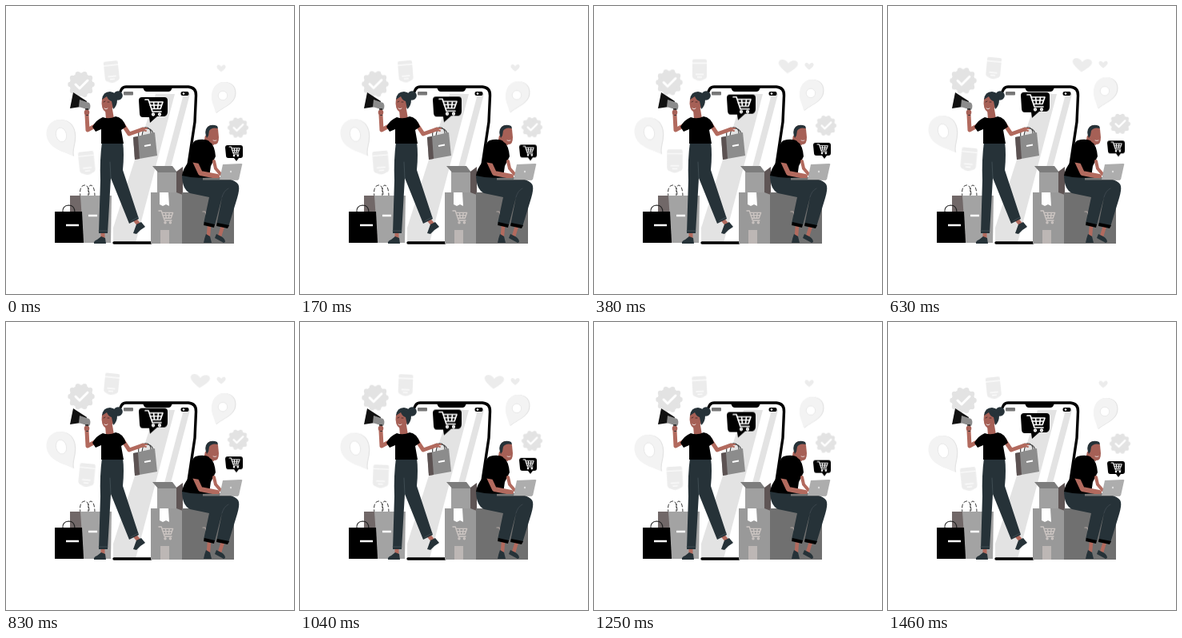
Write an HTML page without scripts that moves like this. It is 360x360 px and loops after 1500 ms.

```html
<!DOCTYPE html>
<html lang="en">
<head>
<meta charset="utf-8">
<title>Online shopping</title>
<style>
  html, body { margin: 0; width: 100%; height: 100%; overflow: hidden; background: #fff; }
  svg { display: block; width: 100vw; height: 100vh; }
  .float {
    --y: -5px; --from: 0deg; --to: 0deg;
    transform-box: fill-box; transform-origin: center;
    animation: float 750ms ease-in-out infinite alternate;
  }
  @keyframes float {
    from { transform: rotate(var(--from)); }
    to { transform: translateY(var(--y)) rotate(var(--to)); }
  }
  .tag { --from: -6deg; --to: 6deg; }
  .bubble { --y: -6.5px; }
  .blink { animation: blink 1500ms step-end infinite; }
  @keyframes blink {
    0%, 81% { visibility: hidden; }
    19% { visibility: visible; }
  }
  .pale { fill: #e3e3e3; }
  .faint { fill: #ececec; }
  .light { fill: #f3f3f3; }
  .skin { fill: #a66056; }
  .dark { fill: #263238; }
  .limb { fill: none; stroke: #b26a5e; stroke-linecap: round; stroke-linejoin: round; }
  .line { fill: none; stroke-linecap: round; stroke-linejoin: round; }
</style>
</head>
<body>
<svg viewBox="0 0 360 360" aria-hidden="true">
  <defs>
    <g id="cart" class="line" stroke-width="1.700">
      <path d="M0 0h4l5 15h11M5 3h17l-3 8.500H8M6 7h14M10.500 3l1 8.500M16.500 3l-1 8.500"/>
      <circle cx="10" cy="18.500" r="1.300"/><circle cx="18" cy="18.500" r="1.300"/>
    </g>
    <g id="badge">
      <circle class="pale" r="14.500"/>
      <circle r="13.500" fill="none" stroke="#e3e3e3" stroke-width="6.500" stroke-linecap="round" pathLength="80" stroke-dasharray="0 8"/>
      <path class="line" d="M-7 0l5 5L8-5" stroke="#fff" stroke-width="3"/>
    </g>
    <g id="tag">
      <path class="faint" d="M-7-14H7Q9-14 9-12V7Q9 10 6 11Q0 15-6 11Q-9 10-9 7V-12Q-9-14-7-14Z"/>
      <path d="M-9-9H9M-5 5H5M-3 8.500H3" stroke="#fafafa" stroke-width="1.300"/>
    </g>
    <path id="heart" class="faint" d="M0 8C-5 4-11-1-10-5C-9-9-3-9 0-4C3-9 9-9 10-5C11-1 5 4 0 8Z"/>
    <path id="left-pin" d="M84 188C77 183 58 181 52 167C47 154 55 142 67 142C80 142 87 152 86 165C86 173 82 180 84 188Z"/>
    <path id="right-pin" d="M262 134C261 126 256 121 257 111C258 101 264 95 272 95C282 95 288 102 286 112C284 123 270 127 262 134Z"/>
    <clipPath id="screen"><path d="M148 103H229Q236 103 236 110L224 295H134V200L143 110Z"/></clipPath>
  </defs>

  <!-- Floating icons -->
  <g class="float"><use href="#badge" x="94" y="98"/></g>
  <g class="float"><use href="#badge" transform="translate(290 152) scale(.78)"/></g>
  <g class="float tag"><use href="#tag" x="132" y="83"/></g>
  <g class="float tag"><use href="#tag" transform="translate(101 197) scale(1.080)"/></g>
  <g class="float">
    <use href="#left-pin" class="pale" x="1.200"/>
    <use href="#left-pin" class="light"/>
    <ellipse cx="69" cy="161" rx="6.500" ry="9" fill="#fff" stroke="#e6e6e6" stroke-width=".8" transform="rotate(-14 69 161)"/>
  </g>
  <g class="float" style="--y:-6px">
    <use href="#right-pin" class="pale" x="1.200"/>
    <use href="#right-pin" class="light"/>
    <circle cx="271" cy="112" r="5.700" fill="#fff" stroke="#e6e6e6" stroke-width=".8"/>
  </g>
  <g class="float"><use href="#heart" transform="translate(269 78) scale(.55)"/></g>
  <g class="blink"><g class="float" style="--y:-4px"><use href="#heart" transform="translate(242.500 78) rotate(5) scale(1.200 1.050)"/></g></g>

  <!-- Phone -->
  <path d="M148 101H229Q238 101 238 111L225 296H133L142 110Z" fill="#fff"/>
  <g clip-path="url(#screen)" class="pale">
    <path d="M187 110H211L162 296H130V290Z"/>
    <path d="M222 110H230L205 205H197Z"/>
  </g>
  <path class="line" d="M143 107Q145 101 150 101H228Q238 102 237.500 112L236 145L227 205M135 296H181" stroke="#000" stroke-width="3.400"/>
  <path d="M169 101H210Q207 102 207 104Q206 107 203 107H176Q173 107 172 104Q172 102 169 101Z"/>
  <rect x="147" y="107" width="12" height="4.500" rx="1" fill="#777"/>
  <rect x="218.500" y="107" width="10" height="5" rx="2"/>
  <circle cx="222" cy="109.500" r="1.300" fill="#fff"/>

  <g class="float bubble">
    <path d="M170 114H198Q202 114 202 118V132Q202 137 198 138H189L180 146L179 139H171Q167 139 167 134L166 118Q166 114 170 114Z"/>
    <use href="#cart" transform="translate(174 117)" stroke="#fff"/>
  </g>

  <!-- Bags on the floor -->
  <path class="line" d="M93 239Q91 225 98 224Q104 223 104 239M103 239Q102 224 106 224Q111 225 111 239" stroke="#333" stroke-width="1" stroke-dasharray="4 3"/>
  <path d="M80 237H97V296H80Z" fill="#716868"/>
  <path d="M93 237H132L131 296H97Z" fill="#a3a3a3"/>
  <path d="M103 262H114" stroke="#fff" stroke-width="2.500"/>
  <path class="line" d="M71 258Q70 250 78 249Q86 249 86 258" stroke="#222" stroke-width="1.200"/>
  <path d="M61 257H95L97 296H61Z"/>
  <path d="M75 274H91" stroke="#fff" stroke-width="2.500"/>

  <!-- Boxes -->
  <path d="M181 233H220V297H181Z" fill="#999"/>
  <path d="M189 207H214V233H189Z" fill="#a0a0a0"/>
  <path d="M183 200H208L214 208H190Z" fill="#7d7d7d"/>
  <path d="M213 207L221 201V236L213 233Z" fill="#5f5555"/>
  <path d="M192 233H203L204 250L200 248L196 250L192 248Z" fill="#fff"/>
  <path d="M193 280H204V297H193Z" fill="#bdb7b5"/>
  <use href="#cart" transform="translate(191 256) scale(.8)" stroke="#cdc6c3"/>
  <path d="M220 233H285V297H220Z" fill="#707070"/>
  <use href="#cart" transform="translate(246 257) scale(.72)" stroke="#b2a7a3"/>

  <!-- Seated man -->
  <g>
    <path class="limb" d="M254 275L253 287M271 275L267 288" stroke-width="4.500"/>
    <path class="dark" d="M250 285L255 288L257 296H247Q248 290 250 285ZM263 285L269 288Q274 291 274 295L272 296L261 290Z"/>
    <path class="dark" d="M220 211L263 214Q289 216 291 225Q292 230 289 240L278 276L263 274L270 239L261 274L247 272L254 239L230 234Q220 229 220 211Z"/>
    <path d="M248 270L261 273L260 277L247 274ZM264 271L279 274L277 278L263 275Z"/>
    <path class="line" d="M270 239Q272 231 278 228" stroke="#455057" stroke-width=".7"/>
    <path class="skin" d="M249 162H261L260 174L247 171Z"/>
    <path d="M237 168Q247 165 255 169Q261 175 262 188L256 200L254 214Q236 216 220 212Q221 204 228 195L232 177Q233 170 237 168Z"/>
    <path class="skin" d="M251 154Q252 149 258 149Q264 149 265 154L266 164Q266 173 261 173Q253 172 251 163Z"/>
    <path class="dark" d="M251 165Q247 156 252 151Q257 147 264 150L265 153Q257 151 254 156L253 162Z"/>
    <path class="line" d="M259 168Q261 169 263 168" stroke="#fff" stroke-width=".7"/>
    <path class="limb" d="M236 194L243 209L264 213" stroke-width="6"/>
    <path class="limb" d="M260 194L262 203L268 210" stroke-width="4"/>
    <path d="M234 177L247 182L242 197L230 195Z"/>
    <path d="M246 215H290V217.500H246Z" fill="#777"/>
    <path d="M271 198L294 197Q296 197 295 199L291 217H267Z" fill="#adadad"/>
    <circle cx="281" cy="207" r="1.200" fill="#ddd"/>
  </g>
  <g class="float bubble" style="--y:-6px">
    <path d="M277 174H293Q296 174 296 177V187Q296 190 293 190H291L288 194L285 190H278Q275 190 275 187L274 177Q274 174 277 174Z"/>
    <use href="#cart" transform="translate(279 176) scale(.6)" stroke="#fff"/>
  </g>

  <!-- Woman -->
  <g>
    <path class="limb" d="M121 280L121 289M160 266L166 273" stroke-width="5"/>
    <path class="dark" d="M119 288L124 290L125 297H110Q109 294 114 292ZM163 273L169 270L174 276Q167 280 163 285L159 284Z"/>
    <path class="dark" d="M120 170H146Q148 185 146 205L166 266L154 272L131 215L127 284H116L118 218Q117 192 120 170Z"/>
    <path class="line" d="M131 215L130 195M156 269L165 264M116 281H127" stroke="#46535a" stroke-width=".8"/>

    <path class="line" d="M166 165Q164 152 173 152Q182 151 181 162M170 163Q171 151 177 153Q183 154 184 160" stroke="#444" stroke-width="1.200"/>
    <path d="M159 164L186 158L189 187L161 192Z" fill="#8c8c8c"/>
    <path d="M159 164L165 163L167 191L161 192Z" fill="#5c5252"/>
    <path d="M173 175L181 173.500" stroke="#fff" stroke-width="2.200"/>

    <path class="limb" d="M146 148L154 160L171 154" stroke-width="5"/>
    <path class="limb" d="M171 153L176 153M171 155L175 156" stroke-width="2"/>
    <path class="limb" d="M113 149L102 155L101 136" stroke-width="5"/>
    <path class="skin" d="M124 129H133L135 141L125 142Z"/>
    <path d="M121 139Q129 142 137 138Q146 139 150 151L144 155L147 172H119L119 154L112 157L108 151Q113 142 121 139Z"/>

    <path class="skin" d="M120 116Q126 109 133 115L134 126Q131 134 125 133Q118 129 120 116Z"/>
    <circle class="dark" cx="140" cy="112" r="5.800"/>
    <path class="dark" d="M120 117Q121 107 130 107Q139 108 139 117Q139 125 134 129L132 119Q128 118 126 113Z"/>
    <path class="line" d="M123 128Q125 130 127 128" stroke="#fff" stroke-width=".8"/>
    <path class="line" d="M122 120L124 119M127 120L129 120" stroke="#3a2422" stroke-width=".8"/>

    <path d="M84 108L101 119L100 125L80 128Z" fill="#111"/>
    <path d="M92 117L104 121Q107 125 104 130L91 126Z" fill="#8c8c8c"/>
    <path d="M99 128L103 128L103 137L100 137Z" fill="#333"/>
    <circle class="skin" cx="101" cy="133" r="3.300"/>
  </g>
</svg>
</body>
</html>
```
